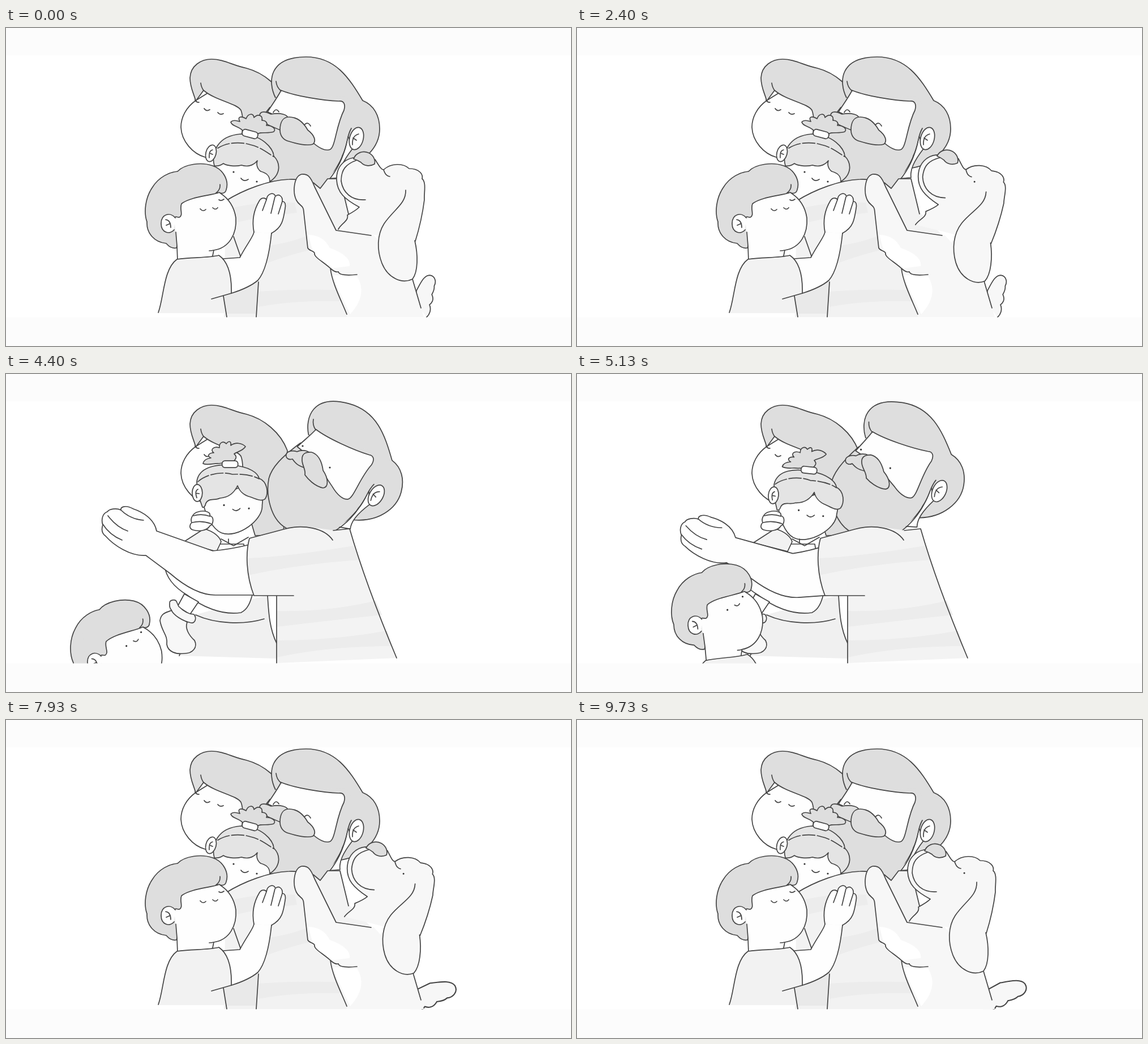
Animation, 998 px wide and 561 px high, one loop 9.79 s. Source, as an HTML page:

```html
<!DOCTYPE html>
<html lang="en">
<head>
<meta charset="utf-8">
<title>Family hug</title>
<style>
html, body { margin: 0; height: 100%; overflow: hidden; background: #fff; }
svg { display: block; width: 100vw; height: 100vh; }
path, ellipse, rect { stroke-width: 1.7; stroke-linecap: round; stroke-linejoin: round; }
.ink { stroke: #444; fill: none; }
.hair { stroke: #444; fill: #dedede; }
.light { fill: #e4e4e4; }
.skin { stroke: #444; fill: #fefefe; }
.cloth { stroke: #444; fill: #f2f2f2; }
.fur { stroke: #444; fill: #f7f7f7; }
.flat { stroke: none; }
.stripe { stroke: none; fill: #ececec; }
.dot { stroke: none; fill: #333; }
</style>
</head>
<body>
<svg viewBox="0 0 998 561">
  <rect class="flat" width="998" height="48" fill="#fcfcfc"/>

  <g id="mom">
    <path class="skin" d="M335 128C318 140 309 158 309 175C310 200 330 222 352 228L420 240 430 150 417 142 380 100Z"/>
    <path class="hair" d="M335 129C333 118 325 106 325 88C326 66 345 55 363 55C385 55 400 66 425 71C455 79 485 103 497 135L490 285H440L415 200C419 175 419 155 415 145C408 133 370 128 349 110Z"/>
    <path class="ink" d="M344 97Q345 105 349 110M334 127q3 5 7 4M350 142q4 6 10 2M374 149q4 5 10 2"/>
  </g>

  <g id="dad">
    <path class="hair" d="M476 123C462 95 464 51 530 51C582 51 606 88 630 128C650 136 660 155 660 178C660 210 632 240 592 247L600 130Z"/>
    <path class="skin" d="M604 190C600 215 590 245 566 266L590 264C588 250 595 235 612 213Z"/>
    <path class="flat" fill="#dedede" d="M606 178C602 212 586 250 557 282L481 292C450 285 430 245 428 215C430 190 440 172 466 140L476 123 600 120C612 130 614 150 606 178Z"/>
    <path class="ink" d="M610 177C602 190 604 202 596 222C588 246 574 266 557 282M466 140C440 172 428 195 428 215C430 245 450 285 481 292"/>
    <path class="skin" d="M486 110C478 125 470 135 462 148L500 165 540 200C552 212 565 218 573 214C582 208 583 172 597 145C600 135 597 128 588 129C560 128 510 120 486 110Z"/>
    <path class="ink" d="M477 94Q478 105 486 111"/>
    <g class="hugging">
      <path class="hair" d="M448 154C449 145 460 148 468 152C485 149 500 153 497 160L484 180C472 174 455 172 448 154Z"/>
      <path class="hair" d="M484 180C484 165 490 157 500 157C515 157 525 166 533 180C546 190 548 200 542 205C530 209 510 203 500 200C490 198 484 190 484 180Z"/>
      <path class="ink" d="M472 149q5-9 10-1M527 171q6-7 11 2"/>
    </g>
    <g class="open" transform="rotate(-15 618 195) translate(-35 -19)">
      <path class="hair" d="M495 146C493 136 505 134 514 137C520 134 530 134 535 138L526 165C512 160 510 155 506 150C500 152 496 149 495 146Z"/>
      <path class="hair" d="M523 150C523 140 530 137 540 138C552 142 558 155 560 170C570 185 570 200 560 201C545 198 533 185 528 178C530 168 522 160 523 150Z"/>
      <g class="dot"><circle cx="524" cy="127" r="1.6"/><circle cx="572" cy="165" r="1.6"/></g>
    </g>
    <ellipse class="skin" cx="619" cy="195" rx="12" ry="20" transform="rotate(15 619 195)"/>
    <path class="ink" d="M623 187Q611 190 612 206M613 194L619 198"/>
  </g>

  <g class="open">
    <path class="flat" fill="#f0f0f0" d="M322 428L306 497 478 502V475C466 450 464 425 462 390Z"/>
    <path class="ink" d="M309 490L306 497M462 390C464 425 466 450 478 475"/>
    <path class="skin" d="M280 338C283 362 300 378 320 390C345 410 380 426 415 421C428 415 432 400 435 390L420 300 300 300Z"/>
    <path class="ink" d="M335 425C370 441 420 443 456 432"/>
    <path class="skin" d="M315 388L303 410 325 424 340 402Z"/>
    <path class="fur" d="M292 417C285 421 274 420 272 435C275 455 286 460 284 477C286 490 300 495 315 493C330 493 339 482 333 470C322 460 316 448 320 438Z"/>
    <path class="fur" d="M289 405C288 398 299 397 301 401L305 410C315 420 325 424 332 424C338 432 333 440 327 439C312 436 295 425 292 416C288 412 289 408 289 405Z"/>
  </g>

  <g id="girl">
    <path class="skin" d="M368 240C365 262 372 290 385 300C410 318 462 297 467 272L475 250 445 230Z"/>
    <g class="hugging">
      <path class="hair" d="M421 184C412 172 400 175 397 166C402 160 410 165 413 165C408 156 415 155 424 160C428 150 437 150 438 158C446 150 454 155 452 163C460 163 462 168 460 172C470 172 478 178 473 183C462 187 448 182 443 188Z"/>
      <path class="hair light" d="M368 243C362 222 372 190 415 187C452 188 472 212 473 226C485 238 486 258 466 271C466 262 462 256 450 253C443 248 442 240 444 234C436 244 425 245 416 242C405 245 390 243 384 239C378 243 372 244 368 243Z"/>
      <path class="ink" stroke-dasharray="22 4" d="M374 212C395 199 420 202 432 206C450 210 464 222 473 227"/>
    </g>
    <g class="open" transform="rotate(15 421 268) translate(14 28)">
      <path class="hair" d="M376 158C368 157 356 162 348 158C349 152 356 149 362 148C354 145 358 139 367 139C360 134 366 127 377 130C376 121 384 117 389 123C395 116 398 120 397 126C407 119 418 123 423 128C418 136 408 137 403 141C409 146 406 150 402 154Z"/>
      <path class="hair light" d="M347 235C342 222 337 205 337 190C340 165 370 158 400 161C430 163 445 175 447 184C462 190 464 210 458 220C452 226 440 220 432 217C420 214 412 206 409 197C402 212 392 218 378 219C368 224 358 218 353 228C352 234 349 236 347 235Z"/>
      <path class="ink" stroke-dasharray="22 4" d="M339 190C355 175 385 172 400 177C415 176 435 178 447 185"/>
    </g>
    <rect class="skin" x="417" y="181" width="28" height="12" rx="5" transform="rotate(15 431 187)"/>
    <ellipse class="skin" cx="362" cy="221" rx="9" ry="15" transform="rotate(15 362 221)"/>
    <path class="ink" d="M365 215Q358 216 359 229M360 221l5 2M415 265q5 7 13 2"/>
    <g class="dot"><circle cx="402" cy="254" r="1.6"/><circle cx="443" cy="271" r="1.6"/></g>
  </g>

  <g class="open">
    <path class="cloth" d="M308 300L350 273C368 278 378 288 380 296L372 313 320 300Z"/>
    <path class="ink" d="M380 291L402 303 428 288M393 291v7"/>
    <path class="skin" d="M328 262C325 255 330 245 340 243C350 240 362 243 360 250C368 252 367 265 360 268C355 277 340 278 330 275C322 272 325 265 328 262Z"/>
    <path class="ink" d="M331 250Q346 246 360 251M329 262Q345 258 362 264"/>
    <g id="arm">
      <path class="skin" d="M430 301C410 306 390 310 365 312L266 277C262 255 240 243 225 238C210 230 202 235 203 240C195 236 182 238 179 243C170 246 168 258 171 266C168 275 170 282 176 286C190 302 220 322 247 320L290 352C320 378 345 390 370 390H440Z"/>
      <path class="ink" d="M203 240Q219 256 243 258M180 250Q195 270 215 277M171 265Q183 284 205 293"/>
    </g>
    <path class="flat" fill="#f3f3f3" d="M430 290C465 283 500 265 530 269L580 276 607 273Q635 370 690 501L478 510V391H438C424 355 423 315 430 290Z"/>
    <path class="stripe" d="M428 325Q500 322 614 303L624 328Q520 335 428 355ZM478 418Q570 420 653 400L664 425Q570 435 478 446ZM478 470Q580 470 673 453L682 480Q570 480 478 500Z"/>
    <path class="ink" d="M577 293C563 272 525 264 490 274C465 281 440 287 430 290C423 315 424 355 438 391H508M478 391V510M578 276L607 273Q635 370 690 501"/>
  </g>

  <g class="hugging">
    <path class="flat" fill="#f2f2f2" d="M388 305C420 285 465 268 500 267C525 266 545 273 555 283L568 266 590 266 605 325 650 370 602 510H385Z"/>
    <path class="stripe" d="M395 318Q450 305 510 308L514 326Q450 332 398 345ZM455 385Q500 380 533 366L536 392Q500 400 452 418ZM446 465Q510 460 585 462L592 482Q510 480 446 492Z"/>
    <path class="ink" d="M388 305C420 285 465 268 500 267Q512 266 520 270M543 273L555 283 568 266 590 266 605 328M402 368L415 405"/>
    <path class="flat" fill="#e9e9e9" d="M380 468L446 445 442 504H388Z"/>
    <path class="ink" d="M446 448L442 510"/>
  </g>

  <g id="boy">
    <g class="hugging">
      <path class="flat" fill="#fefefe" d="M384 407L413 405 438 360 469 362C465 400 458 430 445 445Q430 458 398 468Z"/>
      <path class="skin" d="M438 360C434 340 437 322 448 304C452 298 459 300 460 303C462 291 473 289 476 297C481 292 489 296 488 306C494 306 494 313 493 318C490 338 488 352 469 362"/>
      <path class="ink" d="M384 407L413 405C425 382 437 368 438 360M469 362C465 400 458 430 445 445Q430 458 398 468M460 303L453 322M475 298L468 327M488 306L481 328"/>
    </g>
    <path class="hair" d="M301 388C290 390 285 382 283 380C262 378 248 362 249 342C243 325 246 300 258 282C270 262 290 254 303 253L320 330Z"/>
    <path class="flat" fill="#fefefe" d="M297 332L299 360 302 384 303 410 365 402 367 392C395 388 408 362 406 335C403 315 392 300 378 291L320 290Z"/>
    <path class="ink" d="M300 360L302 384 303 410M359 393Q363 393 367 392L365 402M367 392C395 388 408 362 406 335C403 315 392 300 378 291"/>
    <path class="flat" fill="#f2f2f2" d="M302 408C330 404 355 406 376 401C392 412 399 435 398 468L384 473 389 503H269C279 475 278 425 302 408Z"/>
    <path class="ink" d="M269 502C279 475 278 425 302 408C330 404 355 406 376 401C392 412 399 435 398 468L363 478M384 473L390 510"/>
    <path class="flat" fill="#dedede" d="M296 340C296 334 300 330 306 334C314 330 306 320 310 310C325 298 360 296 377 290C380 293 388 292 389 285C394 270 385 250 365 243C345 236 315 240 303 253L270 280 270 340Z"/>
    <path class="ink" d="M296 336C299 331 302 334 306 334C314 330 306 320 310 310C325 298 360 296 377 290C380 293 388 292 389 285C394 270 385 250 365 243C345 236 315 240 303 253M378 276Q379 285 371 291"/>
    <path class="skin" d="M299 335C290 324 274 328 274 345C274 362 290 365 297 356"/>
    <path class="ink" d="M282 338Q291 339 291 352M283 348l7-3"/>
    <path class="ink hugging" d="M343 319q5 6 10 1M365 317q5 5 9 0M376 303q4 3 9-1"/>
    <g class="open"><path class="ink" d="M358 313q6 4 9-2"/><circle class="dot" cx="345" cy="321" r="1.6"/><circle class="dot" cx="373" cy="299" r="1.6"/></g>
  </g>

  <g id="dog" class="hugging">
    <path id="tail" class="fur" d="M722 482L725 463C732 450 738 436 748 436C758 437 760 448 756 455C757 462 753 468 752 470C757 480 751 486 748 488C752 497 748 506 743 510"/>
    <path class="flat" fill="#f7f7f7" d="M583 357L545 280C538 262 533 257 522 258C508 262 506 290 513 304C518 314 526 312 526 325L533 388C536 394 543 392 545 397C543 404 560 412 573 424C580 455 592 480 602 505V510H738L718 440 650 366Z"/>
    <path class="flat" fill="#fff" d="M534 365Q560 365 572 388Q610 402 607 420L575 424 545 404ZM575 436L620 438Q640 470 608 505Z"/>
    <path class="ink" d="M645 366L583 357 545 280C538 262 533 257 522 258C508 262 506 290 513 304C518 314 526 312 526 325L533 388C536 394 543 392 545 397C543 404 560 412 573 424C576 450 592 480 602 505M573 424Q582 432 587 430Q589 438 620 435M718 443L733 494"/>
    <g id="head">
      <path class="fur" d="M587 355C592 345 606 340 603 330Q618 322 624 316C598 302 585 290 584 268C583 245 597 232 613 229L652 232C660 245 663 250 667 250C680 238 702 238 712 248C730 248 737 258 735 266C743 272 738 292 739 303C735 335 728 360 723 376"/>
      <path class="ink" d="M620 233C600 240 592 250 592 270C595 290 610 305 635 303M667 250Q670 261 678 262"/>
      <path class="hair" d="M614 231C618 220 630 216 640 220C649 224 653 233 651 240C642 245 632 243 627 237Q621 233 614 231Z"/>
      <path class="fur" d="M706 286C707 310 685 320 668 345C655 365 655 392 664 415C675 442 700 452 718 443C728 430 728 400 722 375"/>
      <circle id="eye" class="dot" cx="684" cy="270" r="1.5"/>
    </g>
  </g>
  <rect class="flat" y="510.500" width="998" height="51" fill="#fcfcfc"/>
</svg>
<script>
const LOOP = 9790, REUNION = 3730, EMBRACE = 5200;
const PAUSES = [270, 1330, 4800, 6400, 6800, 8000, 8400];
const part = id => document.getElementById(id);
const ease = (t, from, to) => {
  const k = Math.min(1, Math.max(0, (t - from) / (to - from)));
  return k * k * (3 - 2 * k);
};
const move = (id, x, y, angle = 0, cx = 0, cy = 0) =>
  part(id).setAttribute('transform', `translate(${x} ${y}) rotate(${angle} ${cx} ${cy})`);
const show = (selector, visible) =>
  document.querySelectorAll(selector).forEach(el => el.style.display = visible ? '' : 'none');

// The picture advances at 15 steps a second, with short pauses.
function stepTime(t) {
  const pause = PAUSES.find(start => t >= start && t < start + 196);
  return Math.floor((pause ?? t) * 0.015 + 0.06) / 0.015;
}

function draw(now) {
  const t = stepTime(now % LOOP);
  const apart = t > REUNION - 5 && t < 6000 ? 1 - ease(t, 4700, 5700) : 0;
  const hugging = t < REUNION - 5 || t >= EMBRACE;
  show('.open', !hugging);
  show('.hugging', hugging);

  move('dad', 35 * apart, 19 * apart, 15 * apart, 618, 195);
  move('girl', -14 * apart, -28 * apart, -15 * apart, 421, 268);
  const rise = apart ? 1 - ease(t, 3930, 4400) : 0;
  move('boy', -130 * apart, 164 * apart + 110 * rise, -5 * apart, 285, 345);
  move('arm', 45 * (1 - apart), 0, -10 * (1 - apart), 430, 340);

  const away = t > REUNION - 5 ? 1 - ease(t, EMBRACE, 5870) : 0;
  move('dog', 70 * away, 200 * away);
  const nuzzle = t < REUNION ? t : t - (LOOP - 3600);
  const lean = ease(nuzzle, 830, 1300) - ease(nuzzle, 2470, 3590);
  move('head', 2 * lean, lean, 5.2 * lean, 690, 448);

  const clock = t < REUNION ? t : t - LOOP;
  const phase = clock / 400 - 0.1;
  const swing = Math.abs(phase - Math.round(phase));
  const wag = ease(swing, 0.09, 0.27);
  part('tail').setAttribute('transform',
    `translate(730 485) rotate(${56 * wag}) scale(${1 + 0.25 * wag}) translate(-730 -485)`);
  part('eye').style.opacity = t < 600 || (t > 3200 && t < REUNION) ? 0 : 1;
}

const start = performance.now();
function tick() {
  draw(performance.now() - start);
  requestAnimationFrame(tick);
}
tick();
</script>
</body>
</html>
```
